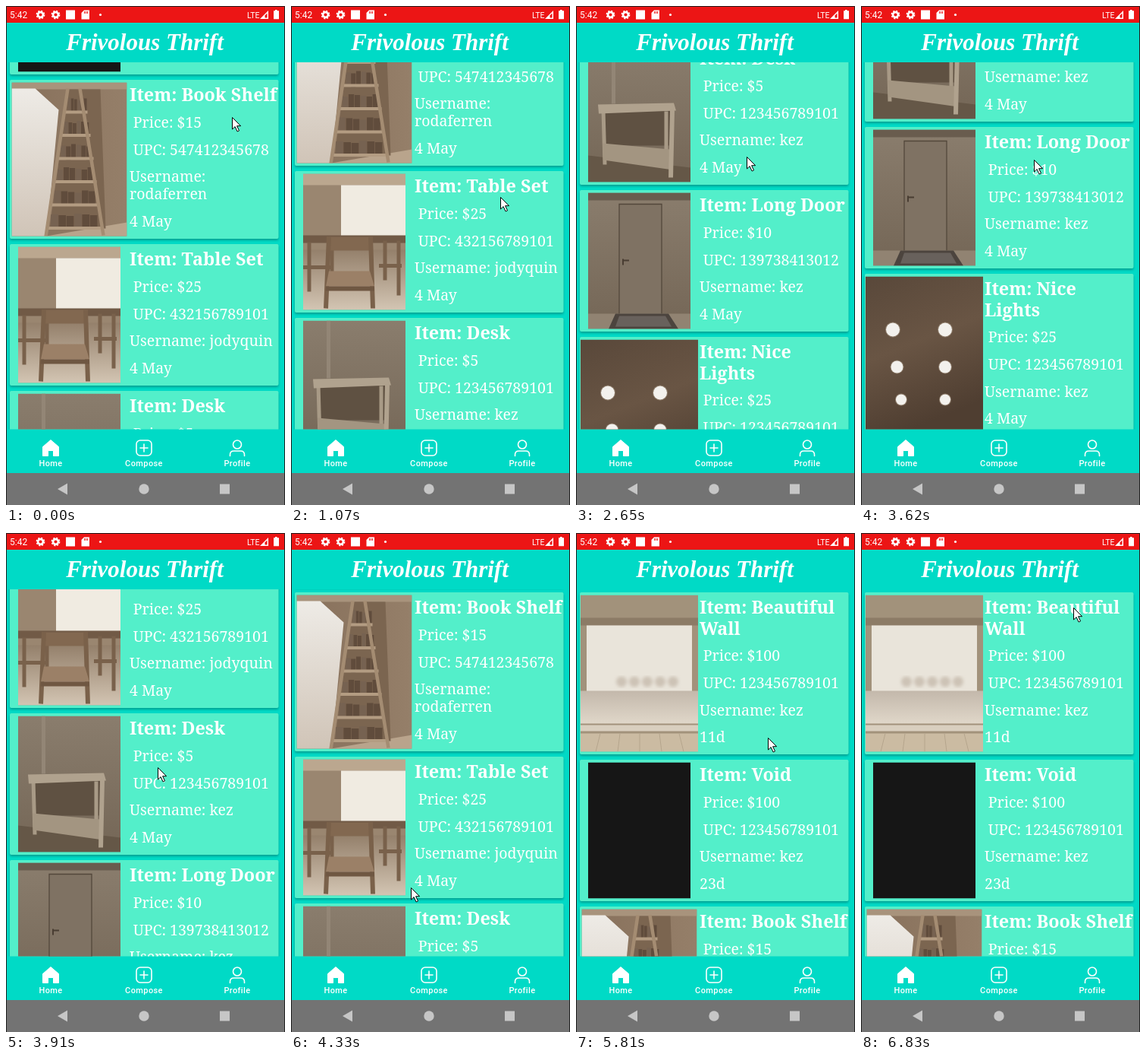
An HTML page that plays this animation: 368 by 656 pixels, repeating every 8000 ms.

```html
<!DOCTYPE html>
<html lang="en">
<head>
<meta charset="utf-8">
<title>Marketplace feed</title>
<style>
html, body { margin: 0; width: 100%; height: 100%; overflow: hidden; background: #00dac6; }
#stage { display: block; width: 368px; height: 656px; }
text { fill: #fff; white-space: pre; }
.name { font: 700 23.4px "Noto Serif", serif; }
.body { font: 19.5px "Noto Serif", serif; }
.brand { font: italic 700 31px "Liberation Serif", serif; text-anchor: middle; }
.tab { font: 500 11px Roboto, sans-serif; letter-spacing: .4px; text-anchor: middle; }
.status { font: 12px Roboto, sans-serif; }
.lte { font-size: 10.5px; }
.card { fill: #53efca; filter: drop-shadow(0 2px 1.5px rgba(0, 50, 45, .35)); }
.line { fill: none; stroke: #fff; stroke-width: 1.6; stroke-linecap: round; }
</style>
</head>
<body>
<svg id="stage" viewBox="0 0 368 656">
  <defs>
    <clipPath id="view"><rect y="74" width="368" height="482.5"/></clipPath>
    <filter id="soft"><feGaussianBlur stdDeviation="2"/></filter>
    <linearGradient id="pane" x2="0" y2="1"><stop stop-color="#eeebe6"/><stop offset="1" stop-color="#d0c4b7"/></linearGradient>
    <linearGradient id="oak"><stop stop-color="#87705b"/><stop offset="1" stop-color="#957f69"/></linearGradient>
    <linearGradient id="floor" x2="0" y2="1"><stop stop-color="#94806b"/><stop offset="1" stop-color="#d3c5b3"/></linearGradient>
    <linearGradient id="dusk" x2="0" y2="1"><stop stop-color="#8a7d6d"/><stop offset="1" stop-color="#746656"/></linearGradient>
    <linearGradient id="dark" x2=".3" y2="1"><stop stop-color="#59483a"/><stop offset=".5" stop-color="#695544"/><stop offset="1" stop-color="#4f3e31"/></linearGradient>
    <linearGradient id="haze" x2="0" y2="1"><stop stop-color="#c3b8ab"/><stop offset="1" stop-color="#e0d7c9"/></linearGradient>
    <g id="gear" fill="none" stroke="#fff">
      <circle r="3.4" stroke-width="2.6"/><circle r="4.9" stroke-width="2" stroke-dasharray="2.1 1.75"/>
    </g>
  </defs>

  <rect width="368" height="656" fill="#00dac6"/>
  <g clip-path="url(#view)"><g id="feed"></g></g>
  <text class="brand" x="183" y="58">Frivolous Thrift</text>

  <rect width="368" height="22" fill="#ec1515"/>
  <g fill="#fff">
    <text class="status" x="5" y="16">5:42</text>
    <use href="#gear" x="45.5" y="11.5"/><use href="#gear" x="65.5" y="11.5"/>
    <rect x="79" y="5.5" width="12" height="12"/>
    <path d="M103 5.5h7v12H99.5V9z"/>
    <path d="M103.5 7v3M105.5 7v3M107.5 7v3" stroke="#ec1515"/>
    <circle cx="124.5" cy="11.5" r="1.6"/>
    <text class="status lte" x="318" y="15.5">LTE</text>
    <path d="M346 6v11h-11z"/><path d="M344.5 9.5v6h-3v-3z" fill="#ec1515"/>
    <path d="M355 5h2.5v1.3h2.5v11h-7v-11h2z"/>
  </g>

  <path d="M59 570.5l10.500 9v12h-7v-7h-7v7h-7v-12z" fill="#fff" stroke="#fff" stroke-linejoin="round"/>
  <g class="line">
    <rect x="172" y="571" width="20" height="20" rx="5"/>
    <path d="M182 576v10M177 581h10"/>
    <circle cx="305" cy="576.5" r="5.5"/>
    <path d="M295.5 591.5v-1.500q0-5 5-5h9q5 0 5 5v1.500"/>
  </g>
  <text class="tab" x="59" y="605">Home</text>
  <text class="tab" x="182" y="605">Compose</text>
  <text class="tab" x="305" y="605">Profile</text>

  <rect y="614" width="368" height="42" fill="#737373"/>
  <g fill="#c6c6c6">
    <path d="M68 635l13-7.5v15z"/><circle cx="182" cy="635" r="6.7"/><rect x="282" y="628.5" width="13" height="13"/>
  </g>
  <path d="M.5 656V.5h367V656" fill="none" stroke="#222"/>
  <path id="cursor" d="M.5 .5v15.500l3.600-3.400 3 6.400 2.400-1.100-2.900-6.200h5z" fill="#fff" stroke="#000"/>
</svg>

<script>
const $ = id => document.getElementById(id);
const repeat = (n, f) => Array.from({ length: n }, (_, i) => f(i)).join('');
const box = (fill, x, y, w, h) => `<rect fill="${fill}" x="${x}" y="${y}" width="${w}" height="${h}"/>`;
const dot = (fill, x, y, r) => `<circle fill="${fill}" cx="${x}" cy="${y}" r="${r}"/>`;
const shape = (fill, d) => `<path fill="${fill}" d="${d}"/>`;
const stroke = (color, width, d) => `<path fill="none" stroke="${color}" stroke-width="${width}" d="${d}"/>`;

// Simplified photos, each drawn from its own top left corner
const wallPhoto = box('#a2927b', 0, 0, 155, 206) + box('#8c7b66', 0, 30, 155, 10) +
  box('#e9e4da', 8, 40, 139, 88) + box('url(#haze)', 0, 126, 155, 43) +
  `<g filter="url(#soft)">${repeat(5, i => dot('#cdc3b6', 54 + i * 17, 114, 7))}</g>` +
  box('#d9cfbf', 0, 171, 155, 8) + box('#cbbba2', 0, 182, 155, 24) +
  stroke('#b5a58c', 1, repeat(5, i => `M${26 + i * 26} 182l${i * 3 - 6} 24`));

const shelfPhoto = box('url(#oak)', 0, 0, 152, 203) + box('#a8937c', 0, 0, 152, 9) +
  shape('url(#pane)', 'M0 8H31L62 36L46 203H0z') + shape('#b9a48c', 'M40 203L152 184V203z') +
  shape('#7b6550', 'M75 9H117L124 192H50z') +
  repeat(6, i => {
    const y = 38 + i * 30.5, left = 70 - i * 4.5, w = 30 + i * 8.5;
    return repeat(6, k => box(k % 3 ? '#604c3c' : '#766251', left + 4 + k * w / 7, y - 18 + (k * 5 + i) % 4, w / 7 - .7, 18)) +
      box('#b39c82', left, y - 1, w, 4);
  }) + stroke('#a48c72', 4.5, 'M74 8L45 203M90 8L121 201');

const tablePhoto = box('#9a8670', 0, 0, 135, 179) + box('#bba78f', 0, 0, 135, 15) +
  box('#f0ebe1', 50, 15, 85, 70) + box('url(#floor)', 0, 100, 135, 79) +
  box('#715a46', 0, 81, 135, 10) +
  stroke('#79614b', 5, 'M8 90V155M126 88V160M38 90V140M108 88V140M0 123H36M100 121H130') +
  box('#826850', 31, 83, 61, 18) + stroke('#7a614a', 6, 'M34 83L30 177M89 83L92 177') +
  shape('#9b8067', 'M34 128H88L94 148H30z') + box('#6f5742', 30, 148, 64, 6);

const deskPhoto = box('url(#dusk)', 0, 0, 135, 179) + shape('#655747', 'M0 144L135 160V179H0z') +
  box('#938676', 31, 0, 5, 76) + box('#5f5142', 20, 85, 88, 46) +
  stroke('#a89a86', 5, 'M20 84L22 156M103 86V140') + shape('#a39581', 'M19 128L108 136L112 163L20 150z') +
  shape('#b0a28e', 'M13 77L113 75L116 85L14 89z') + stroke('#b0a28e', 6, 'M111 84L109 173');

const doorPhoto = box('url(#dusk)', 0, 0, 135, 179) + box('#695c4e', 0, 0, 135, 10) +
  box('#7f7263', 41, 15, 56, 145) + stroke('#53473b', 1.3, 'M41 160V15H97V160') +
  stroke('#493d32', 2, 'M46 87V95M46 89H54') + box('#918372', 0, 159, 135, 20) +
  shape('#4c443e', 'M36 159H106L119 179H27z') + shape('#68615c', 'M41 162H102L110 176H36z');

const lightsPhoto = box('url(#dark)', 0, 0, 155, 206) + repeat(6, i => {
  const row = i >> 1, x = i % 2 ? 105 : 36 + row * 5.5, y = 70 + row * 52 - row * row * 3, r = 9 - row;
  return dot('#8d7b69', x, y, r + 1) + dot('#f3f1ed', x, y, r);
});

const wide = { x: 6, w: 155 }, narrow = { x: 16, w: 135 };
const basic = { upc: '123456789101', user: ['kez'], date: '4 May', ...narrow };
const items = [
  { ...basic, ...wide, name: ['Beautiful', 'Wall'], price: 100, date: '11d', photo: wallPhoto },
  { ...basic, name: ['Void'], price: 100, date: '23d', photo: box('#161616', 0, 0, 135, 179) },
  { ...basic, name: ['Book Shelf'], price: 15, upc: '547412345678', user: ['', 'rodaferren'], x: 7.5, w: 152, photo: shelfPhoto },
  { ...basic, name: ['Table Set'], price: 25, upc: '432156789101', user: ['jodyquin'], photo: tablePhoto },
  { ...basic, name: ['Desk'], price: 5, photo: deskPhoto },
  { ...basic, name: ['Long Door'], price: 10, upc: '139738413012', photo: doorPhoto },
  { ...basic, ...wide, name: ['Nice', 'Lights'], price: 25, photo: lightsPhoto }
];

let cardY = 78;
function card({ name, price, upc, user, date, x, w, photo }) {
  const row = 35.7, nameLine = 27.3, userLine = 23;
  let y = cardY + 28.3, out = '';
  const write = (cls, tx, str) => out += `<text class="${cls}" x="${tx}" y="${y}">${str}</text>`;
  const lines = (cls, label, list, step) => list.forEach((str, i) => {
    if (i) y += step;
    write(cls, 163, i ? str : label + str);
  });

  lines('name', 'Item: ', name, nameLine);
  y += row - 1;
  write('body', 167.7, 'Price: $' + price);
  y += row;
  write('body', 167.7, 'UPC: ' + upc);
  y += row;
  lines('body', 'Username: ', user, userLine);
  y += row;
  write('body', 163, date);

  const top = cardY, h = Math.round(y - top + 16);
  cardY += h + 7;
  return `<rect class="card" x="5" y="${top}" width="354.5" height="${h}" rx="2"/>` +
    `<svg x="${x}" y="${top + 3.5}" width="${w}" height="${h - 7}">${photo}</svg>` + out;
}
$('feed').innerHTML = items.map(card).join('');

// Moves: first step (ms), last step (ms), then the values reached
const scroll = [
  [0, 0, 394], [1070, 1450, 672], [1580, 1580, 678], [2650, 2650, 851], [2780, 2910, 946],
  [3620, 3620, 934], [3770, 4330, 413], [4480, 4480, 411], [5030, 5270, 13], [5390, 5390, 0]
];
const pointer = [
  [0, 0, 298, 146], [250, 370, 234, 361], [520, 520, 234, 396], [920, 1330, 318, 106],
  [1720, 1840, 245, 223], [1990, 2230, 181, 411], [2510, 2510, 181, 399], [2650, 2650, 225, 198],
  [2780, 2910, 230, 63], [3620, 3620, 228, 202], [3770, 4330, 158, 466], [4480, 4630, 205, 352],
  [5030, 5150, 200, 586], [5270, 5270, 200, -99], [5540, 5540, 233, 382], [5810, 5960, 273, 156],
  [6110, 6230, 273, 82], [6530, 6830, 280, 98]
];
const linear = p => p;
const slowing = p => p * (1.5 - p / 2);

// The screen refreshes about every 137 ms, so moves advance in even steps
function at(moves, t, ease) {
  const i = moves.findLastIndex(move => move[0] <= t);
  const [first, last, ...to] = moves[i];
  const [, , ...from] = moves[Math.max(0, i - 1)];
  const gaps = Math.round((last - first) / 137);
  const step = gaps ? Math.min(gaps, Math.floor((t - first) / (last - first) * gaps + 1e-6)) : 0;
  const p = ease((step + 1) / (gaps + 1));
  return to.map((v, k) => from[k] + (v - from[k]) * p);
}

const start = performance.now();
function draw() {
  const t = (performance.now() - start) % 8000;
  $('feed').setAttribute('transform', `translate(0 ${-Math.round(at(scroll, t, slowing)[0])})`);
  $('cursor').setAttribute('transform', `translate(${at(pointer, t, linear).map(Math.round)})`);
  requestAnimationFrame(draw);
}
draw();
</script>
</body>
</html>
```
